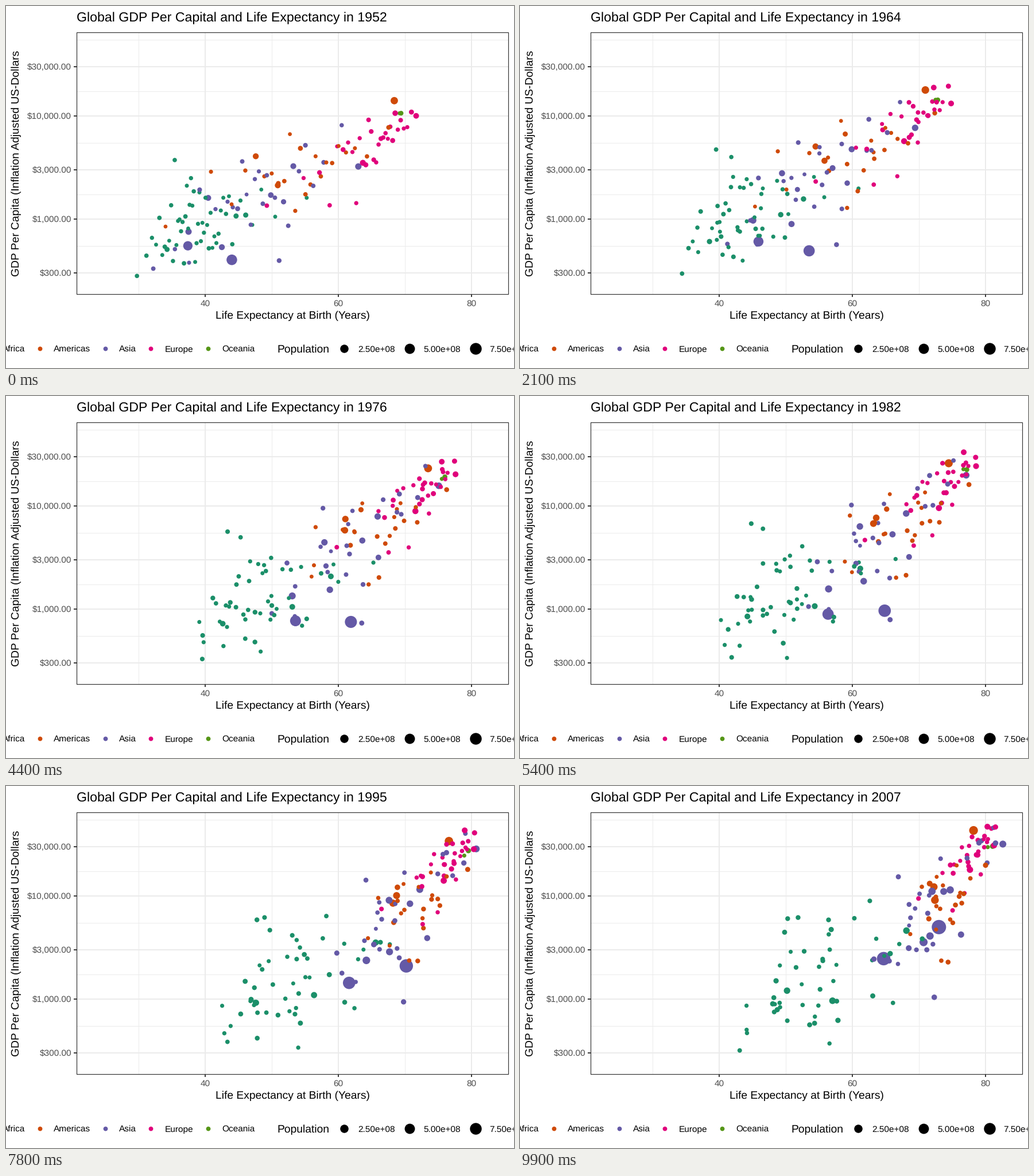
These frames come from a looping animation (885x632 px, 10000 ms). A matplotlib script:

```python
import numpy as np
import matplotlib.pyplot as plt
from matplotlib.animation import FuncAnimation
from matplotlib.patches import Rectangle

W, H, DPI = 885, 632, 100
FRAMES = 100
LEFT, TOP, RIGHT, BOTTOM = 123, 46, 875, 503
STEPS = 11  # five-year intervals, linear in between

COLORS = {"Africa": "#1b8f69", "Americas": "#cf4a07", "Asia": "#6459a6",
          "Europe": "#e0007b", "Oceania": "#559617"}

# The biggest dots: (start, end) of population in millions,
# (start, end, bend) of life expectancy and of income
GIANTS = [
    ("Asia", (556, 1319), (44, 73, 0.7), (400, 4959, -0.8)),
    ("Asia", (372, 1110), (37.4, 64.7, 0.6), (547, 2452, -0.9)),
    ("Americas", (157, 301), (68.4, 78.2, 0.3), (13990, 42952, 0)),
    ("Asia", (82, 224), (37.5, 70.7, 0.1), (750, 3541, -0.3)),
    ("Asia", (86, 127), (63, 82.6, 0.7), (3217, 31656, 1)),
    ("Americas", (56, 190), (50.9, 72.4, 0.1), (2109, 9066, 1)),
]

# Everyone else, by region: count, typical population and its growth,
# (start, end) of life and its spread, of log income and its spread,
# correlation of the two, skew, drift in rank over the years
CLOUDS = {
    "Africa": (52, 3, 3.8, (39.2, 55), (5, 7.5), (2.95, 3.2), (0.25, 0.38),
               0.4, 0.12, 0.9),
    "Americas": (23, 4, 2.6, (53.5, 74), (8, 3), (3.48, 3.93), (0.22, 0.24),
                 0.5, -0.1, 0.6),
    "Asia": (29, 7, 2.7, (46.5, 71.5), (8, 6), (3.15, 3.85), (0.36, 0.44),
             0.65, -0.12, 0.6),
    "Europe": (30, 9, 1.4, (64.5, 77.8), (5, 2.6), (3.7, 4.38), (0.25, 0.21),
               0.8, -0.2, 0.4),
    "Oceania": (2, 4, 2.3, (69.3, 80.7), (0.2, 0.6), (4.01, 4.47),
                (0.01, 0.08), 0.8, 0, 0),
}


def ease(a, b, bend, t):
    return a + (b - a) * (t + bend * t * (1 - t))


def scores(rng, n, drift, t):
    """Evenly filled bell curve whose members slowly trade places."""
    u = (np.arange(n) + 0.5) / n
    z = 0.55 * np.log(u / (1 - u))
    return (np.cos(drift * t) * rng.permutation(z)
            + np.sin(drift * t) * rng.permutation(z))


def cloud(rng, n, size, growth, life, life_sd, gdp, gdp_sd, rho, skew, drift):
    t = np.linspace(0, 1, STEPS + 1)[:, None]
    zx = scores(rng, n, drift, t)
    zy = rho * zx + np.sqrt(1 - rho**2) * scores(rng, n, drift, t)
    zx, zy = (z + skew * (z * z - 1) for z in (zx, zy))
    x = ease(*life, 0.5, t) + ease(*life_sd, 0, t) * zx
    y = ease(*gdp, 0.6, t) + ease(*gdp_sd, 0, t) * zy
    y += rng.normal(0, 0.025, y.shape)
    pop = np.clip(size * np.exp(rng.normal(0, 1.1, n)), 0.2, 60)
    return x, y, pop, pop * growth


def build():
    """Positions per step, populations at both ends and colours."""
    t = np.linspace(0, 1, STEPS + 1)
    x, y, p0, p1, fill = [], [], [], [], []
    for group, pops, life, (g0, g1, bend) in GIANTS:
        x.append(ease(*life, t))
        y.append(ease(np.log10(g0), np.log10(g1), bend, t))
        p0.append(pops[0])
        p1.append(pops[1])
        fill.append(COLORS[group])
    rng = np.random.default_rng(12)
    for group, spec in CLOUDS.items():
        cx, cy, c0, c1 = cloud(rng, *spec)
        x.extend(cx.T)
        y.extend(cy.T)
        p0.extend(c0)
        p1.extend(c1)
        fill += [COLORS[group]] * len(c0)
    first = len(GIANTS)
    order = np.r_[:first, first + rng.permutation(len(x) - first)]
    return (np.array(x)[order].T, np.array(y)[order].T,
            np.array(p0)[order], np.array(p1)[order], np.array(fill)[order])


def px(life):
    return 347 + 11.6 * (life - 40)


def py(log_gdp):
    return 371.5 - 180 * (log_gdp - 3)


def radius(pop):
    return 3.2 + 9.3 * np.sqrt(pop / 1319)


def area(r):
    return (2 * r * 72 / DPI) ** 2


def pt(pixels):
    return pixels * 72 / DPI


plt.rcParams.update({"font.family": "Liberation Sans", "text.hinting": "none"})
fig = plt.figure(figsize=(W / DPI, H / DPI), dpi=DPI, facecolor="white")
ax = fig.add_axes([0, 0, 1, 1])
ax.set(xlim=(0, W), ylim=(H, 0))
ax.axis("off")


def label(x, y, s, size=15.4, color="black", **kw):
    return ax.text(x, y, s, fontsize=pt(size), color=color,
                   va=kw.pop("va", "baseline"), **kw)


def line(x, y, color, width):
    ax.plot(x, y, color=color, lw=pt(width), zorder=1, solid_capstyle="butt")


GRID, INK, GREY = "#ebebeb", "#333333", "#4d4d4d"
for life in (30, 50, 70):
    line([px(life)] * 2, [TOP, BOTTOM], GRID, 1)
for y in np.arange(58.5, 420, 90):
    line([LEFT, RIGHT], [y, y], GRID, 1)
for gdp in (300, 1000, 3000, 10000, 30000):
    y = py(np.log10(gdp))
    line([LEFT, RIGHT], [y, y], GRID, 2)
    line([LEFT - 5, LEFT], [y, y], INK, 1.9)
    label(114, y + 5.5, f"\\${gdp:,.2f}", color=GREY, ha="right")
for life in (40, 60, 80):
    x = px(life)
    line([x, x], [TOP, BOTTOM], GRID, 2)
    line([x, x], [BOTTOM, BOTTOM + 5], INK, 1.9)
    label(x, 523.5, str(life), color=GREY, ha="center")
panel = Rectangle((LEFT, TOP), RIGHT - LEFT, BOTTOM - TOP, fill=False,
                  ec=INK, lw=pt(1.2), zorder=5)
ax.add_patch(panel)

title = label(LEFT, 27, "", 23.1)
label(499, 546, "Life Expectancy at Birth (Years)", 19.3, ha="center")
label(27, 274.5, "GDP Per Capita (Inflation Adjusted US-Dollars", 19.3,
      rotation=90, ha="right", va="center")

label(33.5, 603.5, "Africa", ha="right")
for x, group in zip((58.5, 172.5, 252, 351.5), list(COLORS)[1:]):
    ax.scatter(x, 597.7, s=area(3.9), c=COLORS[group], lw=0)
    label(x + 24.8, 603.5, group)
label(472, 605, "Population", 19.3)
for x, pop in zip((588.5, 703, 817.5), (250, 500, 750)):
    ax.scatter(x, 597.7, s=area(radius(pop)), c="black", lw=0)
    label(x + 24.5, 603.5, f"{pop / 100:.2f}e+08")

LIFE, GDP, POP0, POP1, FILL = build()
dots = ax.scatter(px(LIFE[0]), py(GDP[0]), s=area(radius(POP0)), c=FILL,
                  lw=0, zorder=3)
dots.set_clip_path(panel)


def draw(i):
    t = i / (FRAMES - 1)
    k = min(int(t * STEPS), STEPS - 1)
    f = t * STEPS - k
    life = LIFE[k] + f * (LIFE[k + 1] - LIFE[k])
    gdp = GDP[k] + f * (GDP[k + 1] - GDP[k])
    dots.set_offsets(np.column_stack([px(life), py(gdp)]))
    dots.set_sizes(area(radius(POP0 * (POP1 / POP0) ** t)))
    year = round(1952 + 55 * t)
    title.set_text(f"Global GDP Per Capital and Life Expectancy in {year}")
    return dots, title


anim = FuncAnimation(fig, draw, frames=FRAMES, interval=100, repeat=True,
                     repeat_delay=0, blit=False)
plt.show()
```
